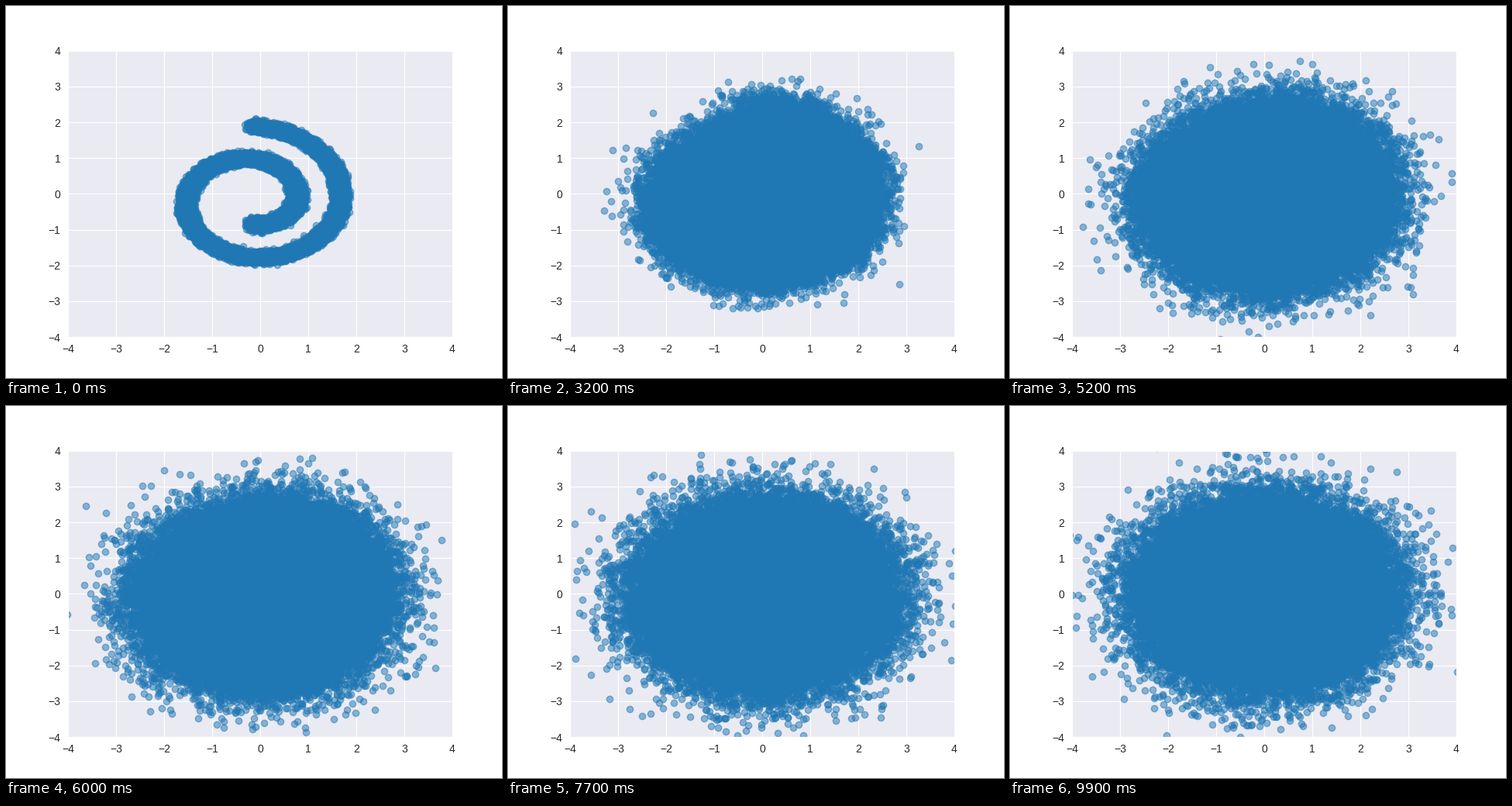
A matplotlib script for the animation above (10 s loop, 640x480 px).

```python
import matplotlib.pyplot as plt
import numpy as np
from matplotlib.animation import FuncAnimation

FRAMES, INTERVAL = 100, 100
N = 100000
LIMIT = 4
INK = "0.15"

plt.rcParams.update({
    "font.family": "Liberation Sans",
    "font.size": 10,
    "axes.facecolor": "#EAEAF2",
    "axes.edgecolor": "white",
    "axes.axisbelow": True,
    "grid.color": "white",
    "grid.linewidth": 0.8,
})


def swiss_roll(n, noise, rng):
    """Noisy flat spiral, shifted and scaled to mean 0 and deviation 1."""
    t = 1.5 * np.pi * (1 + 2 * rng.random(n))
    pts = np.column_stack([t * np.cos(t), t * np.sin(t)])
    pts += noise * rng.standard_normal(pts.shape)
    return (pts - pts.mean()) / pts.std()


def diffuse(pts, step):
    """Forward diffusion with a cosine noise schedule."""
    angle = (step / FRAMES + 0.008) / 1.008 * np.pi / 2
    eps = np.random.default_rng(1000 + step).standard_normal(pts.shape)
    return np.cos(angle) * pts + np.sin(angle) * eps


def thin(pts, cell=(0.024, 0.032)):
    """Keep one point per 1.5-pixel cell: the rest would be hidden."""
    ij = np.floor(pts / cell).astype(int)
    _, keep = np.unique(ij[:, 0] * 10000 + ij[:, 1], return_index=True)
    return pts[np.sort(keep)]


roll = swiss_roll(N, 0.42, np.random.default_rng(7))

fig = plt.figure(figsize=(6.4, 4.8), dpi=100, facecolor="white")
ax = fig.add_axes([0.125, 0.11, 0.775, 0.77])
ax.set(xlim=(-LIMIT, LIMIT), ylim=(-LIMIT, LIMIT))
ticks = range(-LIMIT, LIMIT + 1)
ax.set_xticks(ticks)
ax.set_yticks(ticks)
ax.tick_params(length=3.5, pad=3.5, bottom=False, left=False, labelcolor=INK)
ax.tick_params(axis="x", pad=2.7)
ax.grid(True)

dots = ax.scatter([], [], s=36, color="#1f77b4", alpha=0.5, linewidths=1.0)


def update(step):
    dots.set_offsets(thin(diffuse(roll, step)))
    return (dots,)


anim = FuncAnimation(fig, update, frames=FRAMES, interval=INTERVAL,
                     repeat=True, repeat_delay=0)
plt.show()
```
